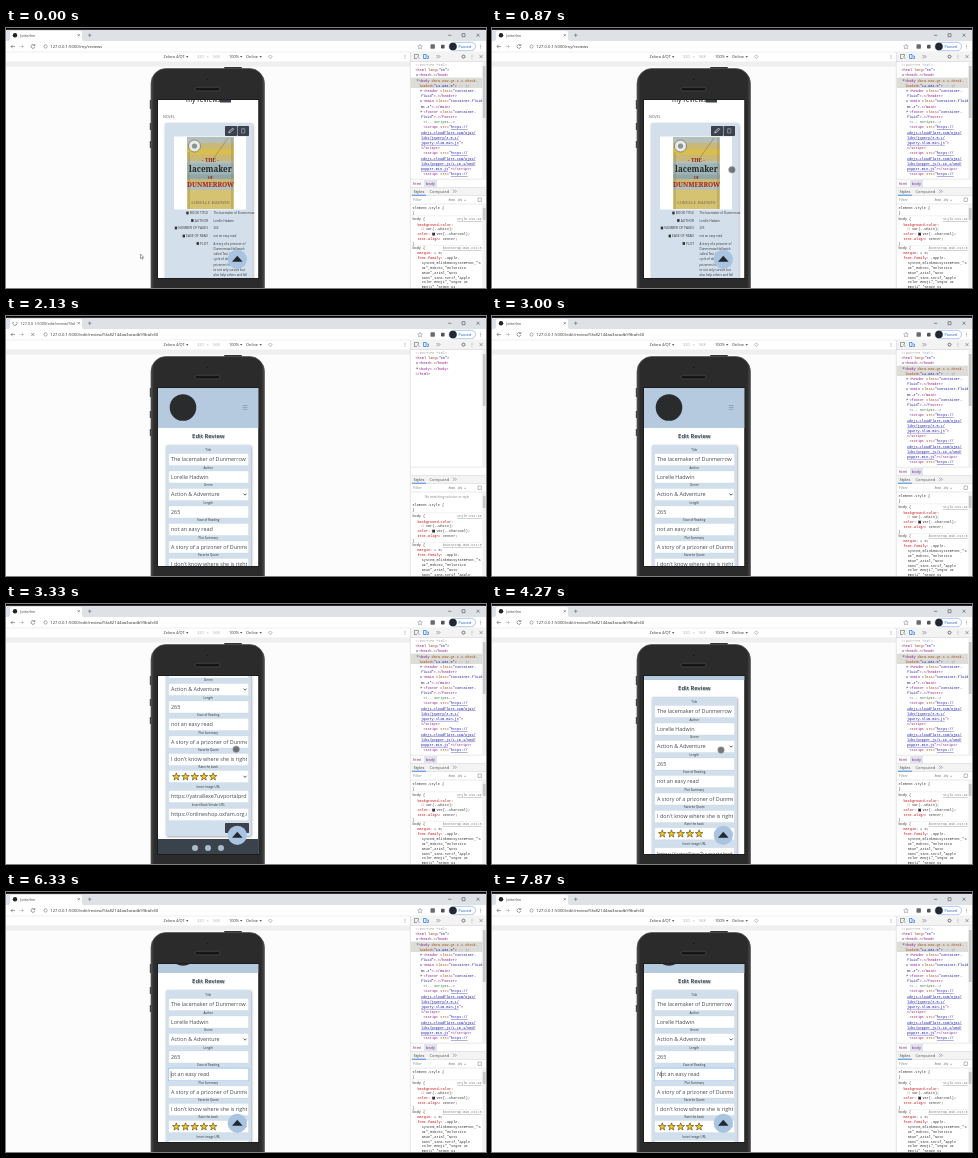
Recreate the animation shown at these times as an HTML page. Size 480 by 260 pixels, loop 8000 ms.

```html
<!DOCTYPE html>
<html lang="en">
<head>
<meta charset="utf-8">
<title>Edit review</title>
<style>
html, body { margin: 0; width: 100%; height: 100%; overflow: hidden; background: #fff; }
svg { display: block; width: 480px; height: 260px; }
text { font-family: "Open Sans", "Noto Sans", sans-serif; white-space: pre; }
.code { font-family: "Liberation Mono", "DejaVu Sans Mono", monospace; }
</style>
</head>
<body>
<svg id="stage" viewBox="0 0 480 260" xmlns="http://www.w3.org/2000/svg">
  <defs>
    <clipPath id="screen"><rect x="152" y="72" width="100.5" height="178"/></clipPath>
    <clipPath id="field"><rect x="163" y="130" width="78" height="200"/></clipPath>
    <clipPath id="tab"><rect x="14" y="2" width="55" height="11"/></clipPath>
    <linearGradient id="case">
      <stop offset="0" stop-color="#4a4a4a"/><stop offset=".03" stop-color="#2b2b2b"/>
      <stop offset=".97" stop-color="#2b2b2b"/><stop offset="1" stop-color="#4a4a4a"/>
    </linearGradient>
    <filter id="soft" x="-10%" y="-10%" width="120%" height="120%">
      <feDropShadow dx=".6" dy=".8" stdDeviation="1" flood-color="#445" flood-opacity=".55"/>
    </filter>
  </defs>
</svg>
<script>
const LOOP = 8000;
const stage = document.getElementById('stage');

function add(parent, tag, attrs = {}) {
  const node = document.createElementNS('http://www.w3.org/2000/svg', tag);
  for (const k in attrs) node.setAttribute(k, attrs[k]);
  return parent.appendChild(node);
}
const group = (p, attrs) => add(p, 'g', attrs);
const box = (p, x, y, width, height, fill, more) => add(p, 'rect', { x, y, width, height, fill, ...more });
const dot = (p, cx, cy, r, fill, more) => add(p, 'circle', { cx, cy, r, fill, ...more });
const line = (p, d, stroke = '#5f6368', w = .6, more) =>
  add(p, 'path', { d, stroke, 'stroke-width': w, fill: 'none', ...more });
const shape = (p, d, fill, more) => add(p, 'path', { d, fill, ...more });

// Text placed by its vertical centre
function text(p, x, cy, str, size, fill = '#333', more) {
  const t = add(p, 'text', { x, y: cy + size * .35, 'font-size': size, fill, ...more });
  t.textContent = str;
  return t;
}
const mid = { 'text-anchor': 'middle' };
const end = { 'text-anchor': 'end' };

// Code line: parts split by "|", each led by a colour letter
const INK = { t: '#881280', a: '#994500', v: '#1a1aa6', u: '#1a1aa6', c: '#236e25', g: '#a8a8a8', k: '#333', r: '#c80000' };
function code(p, x, cy, src) {
  const t = text(p, x, cy, '', 3.5, '#333', { class: 'code' });
  for (const part of src.split('|')) {
    const span = add(t, 'tspan', { fill: INK[part[0]] });
    if (part[0] === 'u') span.setAttribute('text-decoration', 'underline');
    span.textContent = part.slice(1);
  }
}
const fold = (p, x, y, open) =>
  shape(p, open ? `M${x} ${y - .8}h2.2l-1.1 1.8z` : `M${x} ${y - 1.1}v2.2l1.8-1.1z`, '#6e6e6e');

// Browser frame
box(stage, 0, 0, 480, 260, '#fcfcfc');
box(stage, 0, 0, 480, 13, '#dee1e6');
box(stage, 0, 0, 480, 1.8, '#000');
shape(stage, 'M2 13q2 0 2-2v-6q0-2 2-2h68q2 0 2 2v6q0 2 2 2z', '#fff');
const favicon = dot(stage, 9, 7.3, 2.2, '#222');
const spinner = line(stage, 'M9 5.2a2.1 2.1 0 1 1-2.1 2.1', '#777', .7);
const tabTitle = text(group(stage, { 'clip-path': 'url(#tab)' }), 14.3, 7.3, '', 3.8, '#3c4043');
line(stage, 'M71.5 6l2.4 2.4m0-2.4l-2.4 2.4M82 7.2h3.4m-1.7-1.7v3.4');
line(stage, 'M442 7.3h3.4M456 5.7h3v3h-3zM470.5 5.7l3 3m0-3l-3 3', '#333', .5);
box(stage, 0, 13, 480, 11, '#fff');
line(stage, 'M9 18.5h-4m1.8-1.8l-1.8 1.8l1.8 1.8');
line(stage, 'M13.5 18.5h4m-1.8-1.8l1.8 1.8l-1.8 1.8', '#aaa');
const reload = line(stage, 'M28.5 17.3a1.9 1.9 0 1 0 .3 1.6M28.8 16v1.6h-1.6');
const stop = line(stage, 'M25.3 17l3 3m0-3l-3 3');
dot(stage, 39.5, 18.5, 1.6, 'none', { stroke: '#5f6368', 'stroke-width': .5 });
const url = text(stage, 44.3, 18.6, '', 4.2, '#333');
line(stage, 'M414 16.2l.7 1.6 1.7.2-1.3 1.2.4 1.7-1.5-.9-1.5.9.4-1.7-1.3-1.2 1.7-.2z', '#5f6368', .4);
box(stage, 424.5, 16.3, 4.4, 4.4, '#686c72', { rx: .6 });
box(stage, 435, 16.7, 3.6, 3.8, '#50545a', { rx: .8 });
box(stage, 443, 14.3, 26.5, 8.4, '#fff', { rx: 4.2, stroke: '#8ab0ee', 'stroke-width': .7 });
dot(stage, 447, 18.5, 3.8, '#23272f');
text(stage, 452.5, 18.5, 'Paused', 3.7, '#1a62c8');
const dots = (x, y) => [-1.5, 0, 1.5].forEach(d => dot(stage, x, y + d, .45, '#5f6368'));
dots(474.5, 18.5);

// Device bar
box(stage, 0, 24, 404, 9.5, '#fff');
box(stage, 0, 33.5, 404, 5, '#efefef');
line(stage, 'M0 24H480', '#dcdee0', .5);
[[157.5, 'Zelora 4/QT', '#333'], [191, '320', '#aaa'], [200.5, '×', '#aaa'], [207, '568', '#aaa'],
 [223, '100%', '#333'], [240, 'Online', '#333']].forEach(([x, s, c]) => text(stage, x, 28.7, s, 3.9, c));
[180, 234, 253.5].forEach(x => shape(stage, `M${x} 28h2.4l-1.2 1.7z`, '#555'));
line(stage, 'M262.5 28.7l1.8-1.8 1.8 1.8-1.8 1.8z', '#777', .5);
dots(399, 28.7);

// Phone
box(stage, 218, 39, 18, 3, '#333', { rx: 1 });
[[72, 9], [95, 7], [113, 7]].forEach(([y, h]) => box(stage, 143.8, y, 2, h, '#3a3a3a', { rx: .6 }));
box(stage, 145, 40.5, 113.5, 240, 'url(#case)', { rx: 15, stroke: '#555', 'stroke-width': .7 });
dot(stage, 201.7, 51.5, 1.3, '#15181c', { stroke: '#444', 'stroke-width': .4 });
box(stage, 189, 59.3, 25, 3.6, '#151515', { rx: 1.8, stroke: '#555', 'stroke-width': .6 });
box(stage, 151.3, 71.3, 101.9, 179.4, '#181818');
const screen = group(stage, { 'clip-path': 'url(#screen)' });
box(screen, 152, 72, 100.5, 178, '#fff');

// Reviews page
const reviews = group(screen);
text(reviews, 180, 72.2, 'my reviews', 6.4, '#444', { 'font-weight': 600 });
box(reviews, 214, 71, 11, 3.5, '#3a3f47');
text(reviews, 157, 89, 'NOVEL', 3.7, '#666');
box(reviews, 159, 95, 87.5, 170, '#d3e0ec', { rx: 1.5, filter: 'url(#soft)' });
const editBtn = box(reviews, 219, 98, 12, 10, '#3b424d', { rx: .8 });
box(reviews, 231.5, 98, 11.5, 10, '#3b424d', { rx: .8 });
line(reviews, 'M222.7 104.8l.6-1.6 3.4-3 1 1-3.4 3.2z', '#e8eef5', .7);
line(reviews, 'M235 101h4.4M235.6 101.5v3.4h3.2v-3.4M236.5 100.3h1.4', '#aebccb', .6);
box(reviews, 168, 108.5, 72, 73, '#fff');
const cover = group(reviews);
box(cover, 181, 109, 47, 72, '#c9b877');
for (let i = 0; i < 6; i++) box(cover, 181, 109 + i * 12, 47, 6, i % 2 ? '#8fa7a8' : '#b5bfba');
box(cover, 181, 121, 47, 6, '#d8bd4f');
box(cover, 181, 162, 47, 19, '#d6c372');
box(cover, 181, 135.5, 47, 11, '#9fb4b4');
line(cover, 'M222 110L205 134M226 110v71M183 124v57', '#8d7e50', .6);
dot(cover, 188.5, 118, 6, '#e9ebe6', { stroke: '#777', 'stroke-width': .8 });
dot(cover, 188.5, 118, 2.6, '#8b948f');
const serif = { ...mid, 'font-weight': 700, style: 'font-family:"Noto Serif",serif' };
text(cover, 204.5, 132, '· THE ·', 5.2, '#8d2a22', serif);
text(cover, 204.5, 141, 'lacemaker', 8, '#242a2c', serif);
text(cover, 204.5, 149.3, 'OF', 4, '#8d2a22', serif);
text(cover, 204.5, 156.6, 'DUNMERROW', 6.6, '#a3241f', serif);
text(cover, 204.5, 175, 'LORELLE HADWIN', 4, '#8a835c', serif);
[['BOOK TITLE', 'The lacemaker of Dunmerrow', 185], ['AUTHOR', 'Lorelle Hadwin', 192.5],
 ['NUMBER OF PAGES', '265', 200], ['EASE OF READ', 'not an easy read', 208], ['PLOT', '', 215.5]]
  .forEach(([label, value, y]) => {
    const t = text(reviews, 202, y, label, 3.3, '#333', end);
    box(reviews, 198.5 - t.getComputedTextLength(), y - 1.4, 2.4, 2.8, '#333');
    text(reviews, 207.5, y, value, 2.95, '#333');
  });
['A story of a prizoner of', 'Dunmerrow-Hallowick', 'called Tovi. In a long', 'cycle of danger for the', 'prizoners he struggles',
 'to not only survive but', 'also help others and fall'].forEach((s, i) => text(reviews, 207.5, 215.5 + i * 5.25, s, 3, '#333'));

// Edit page
const edit = group(screen);
box(edit, 152, 72, 100.5, 40, '#b6cadf');
dot(edit, 177, 91.5, 13.3, '#2a2b2d');
line(edit, 'M236.8 89.5h4.6m-4.6 1.9h4.6m-4.6 1.9h4.6', '#77879a', .6);
text(edit, 202.3, 120, 'Edit Review', 5.9, '#333a44', { ...mid, 'font-weight': 600, style: 'text-shadow:.5px .6px 1px #9aa' });
box(edit, 160, 129, 85, 196, '#d0dfeb', { rx: 1.5, filter: 'url(#soft)' });
const ring = box(edit, 162, 206.7, 81.2, 13.4, '#80bdff', { rx: 1.6 });
const fields = [['Title', 'The lacemaker of Dunmerrow', 143.4], ['Author', 'Lorelle Hadwin', 160.9],
  ['Genre', 'Action & Adventure', 178.4], ['Length', '265', 195.9], ['Ease of Reading', 'not an easy read', 213.4],
  ['Plot Summary', 'A story of a prizoner of Dunme', 230.9], ['Favorite Quote', "I don't know where she is right", 248.4],
  ['Rate the book', '', 265.6], ['Insert image URL', 'https://yatra8exe7uvportalprd', 285.6],
  ['Insert Book Vendor URL', 'https://onlineshop.oxfam.org.u', 303.4]];
const inputs = fields.map(([label, value, y]) => {
  text(edit, 202.3, y - 9.3, label, 3, '#333', mid);
  box(edit, 162.7, y - 6, 79.8, 12, '#fff', { rx: 1, stroke: '#c6d0da', 'stroke-width': .3 });
  return text(group(edit, { 'clip-path': 'url(#field)' }), 165, y, value, 5.4, '#444b54');
});
[178.4, 265.6].forEach(y => line(edit, `M237.6 ${y - .8}l1.5 1.6l1.5-1.6`, '#333', .8));
for (let i = 0; i < 5; i++) {
  let d = '';
  for (let k = 0; k < 10; k++) {
    const r = k % 2 ? 1.7 : 4, a = k * Math.PI / 5;
    d += `${k ? 'L' : 'M'}${170.3 + i * 9.2 + r * Math.sin(a)} ${265.8 - r * Math.cos(a)}`;
  }
  shape(edit, d + 'z', '#f5c518', { stroke: '#4b4020', 'stroke-width': .6 });
}
box(edit, 219, 312, 24, 10, '#3b424d', { rx: .8 });
box(edit, 152, 328, 100.5, 16, '#3a424c');
[189, 202, 215].forEach(x => dot(edit, x, 337, 3, '#a9bccd'));
const caret = box(edit, 0, 210.2, .5, 6.6, '#222');

// Back-to-top button
const toTop = group(screen);
dot(toTop, 231.3, 231.3, 9.6, '#a9c4e0');
shape(toTop, 'M226 233.8l5.3-6 5.3 6z', '#22282f');

// Developer tools
box(stage, 404, 24, 76, 236, '#fff');
box(stage, 404, 24, 76, 9.5, '#f3f3f3');
line(stage, 'M404.3 24V260M404 33.5H480', '#c8c8c8', .5);
line(stage, 'M411 30.5h-2.5v-4h4v2M411 28.5l2.5 2.2', '#666', .6);
line(stage, 'M417.5 26.5h2.6v4h-2.6zM421 28h1.4v2.5h-1.4', '#1a73e8', .7);
line(stage, 'M430.5 27l1.5 1.6-1.5 1.6m2-3.2l1.5 1.6-1.5 1.6', '#666', .6);
dot(stage, 457.5, 28.6, 1.5, 'none', { stroke: '#666', 'stroke-width': .9 });
dots(466, 28.6);
line(stage, 'M473.5 27.1l3 3m0-3l-3 3', '#666', .6);

const tree = group(stage), loadTree = group(stage);
const row = i => 36.7 + i * 5.2;
for (const g of [tree, loadTree]) {
  if (g === tree) box(g, 404.6, 49.6, 72, 10.4, '#dcddd8');
  code(g, 409.5, row(0), 'g<!DOCTYPE html>');
  code(g, 409.5, row(1), 't<html |alang|t=|v"en"|t>');
  fold(g, 410.5, row(2));
  code(g, 413, row(2), 't<head>|k…|t</head>');
}
fold(loadTree, 410.5, row(3));
code(loadTree, 413, row(3), 't<body>|k…|t</body>');
code(loadTree, 409.5, row(4), 't</html>');
fold(tree, 410.5, row(3), true);
[[413, 't<body |adata-new-gr-c-s-check-'], [413, 'aloaded|t=|v"14.983.0"|t>|g == $0'],
 [417.5, 't<header |aclass|t=|v"container-'], [415, 'vfluid"|t>|k…|t</header>'],
 [417.5, 't<main |aclass|t=|v"container-fluid'], [415, 'vmt-3"|t>|k…|t</main>'],
 [417.5, 't<footer |aclass|t=|v"container-'], [415, 'vfluid"|t>|k…|t</footer>'],
 [417.5, 'c<\!-- Scripts-->'], [417.5, 't<script |asrc|t="|uhttps://'],
 [415, 'ucdnjs.cloudflare.com/ajax/'], [415, 'ulibs/jquery/3.5.1/'], [415, 'ujquery.slim.min.js|t">'], [415, 't<\/script>'],
 [417.5, 't<script |asrc|t="|uhttps://'], [415, 'ucdnjs.cloudflare.com/ajax/'],
 [415, 'ulibs/popper.js/1.16.1/umd/'], [415, 'upopper.min.js|t"><\/script>'], [417.5, 't<script |asrc|t="|uhttps://']]
  .forEach(([x, s], i) => code(tree, x, row(i + 3), s));
[5, 7, 9].forEach(i => fold(tree, 414.5, row(i)));
box(tree, 418, 152, 13, 7, '#dfe5ee');
text(tree, 407, 155.6, 'html', 3.8, '#881280');
text(tree, 420, 155.6, 'body', 3.8, '#881280');

const styles = group(stage);
code(styles, 406.5, 179.3, 'kelement.style {');
code(styles, 406.5, 184.3, 'k}');
code(styles, 406.5, 191, 'kbody {');
[[196.3, 'rbackground-color|k:'], [201.2, 'k  □ var(--white);'], [206.1, 'rcolor|k:   var(--charcoal);'], [211, 'rtext-align|k: center;']]
  .forEach(([y, s]) => code(styles, 411.5, y, s));
box(styles, 426.2, 204.7, 2.8, 2.8, '#333');
code(styles, 406.5, 215.3, 'k}');
code(styles, 406.5, 219.8, 'kbody {');
['rmargin|k: ▸ 0;', 'rfont-family|k: -apple-', 'k  system,BlinkMacSystemFont,"S', 'k  UI",Roboto,"Helvetica', 'k  Neue",Arial,"Noto',
 'k  Sans",sans-serif,"Apple', 'k  Color Emoji","Segoe UI', 'k  Emoji","Segoe UI'].forEach((s, i) => code(styles, 411.5, 224.8 + i * 4.9, s));
[[191, 'style.css:24'], [219.8, 'bootstrap.min.css:6']].forEach(([y, s]) =>
  text(styles, 475.5, y, s, 3.4, '#777', { ...end, class: 'code', 'text-decoration': 'underline' }));
line(styles, 'M404 187.8H476M404 217.5H476', '#e0e0e0', .4);
const noMatch = text(stage, 441, 181, 'No matching selector or style', 3.5, '#888', { ...mid, 'font-style': 'italic' });

box(stage, 404.6, 159.5, 75.4, 8, '#f3f3f3');
line(stage, 'M404 151.2H480M404 159.5H480M404 167.5H480M404 176H480', '#d0d0d0', .5);
line(stage, 'M406 167.2H420', '#1a73e8', .8);
text(stage, 407.5, 163.3, 'Styles', 4, '#333');
text(stage, 423.5, 163.3, 'Computed', 4, '#555');
line(stage, 'M447 161.8l1.4 1.5-1.4 1.5m2-3l1.4 1.5-1.4 1.5', '#666', .5);
text(stage, 407, 171.8, 'Filter', 3.8, '#888');
text(stage, 442, 171.8, ':hov  .cls  +', 3.6, '#555');
line(stage, 'M472 170h3.4v3.4h-3.4z', '#777', .5);
box(stage, 476.4, 33.8, 3.6, 117, '#f1f1f1');
box(stage, 476.4, 176.2, 3.6, 84, '#f1f1f1');
box(stage, 476.8, 38, 2.8, 52, '#c8c8c8');
box(stage, 476.8, 180, 2.8, 12, '#c8c8c8');

// Pointers
const arrow = shape(stage, 'M0 0v4.6l1.1-1 .8 1.7.7-.3-.8-1.7h1.5z', '#fff', { stroke: '#222', 'stroke-width': .4 });
const touch = dot(stage, 0, 0, 3.3, '#4d4d4d', { stroke: '#888', 'stroke-width': .5 });

// Rows of [time, value, ...]; values move linearly between rows
function track(rows, t) {
  if (t <= rows[0][0]) return rows[0].slice(1);
  for (let i = 1; i < rows.length; i++) {
    const [a, b] = [rows[i - 1], rows[i]];
    if (t < b[0]) return a.slice(1).map((v, k) => v + (b[k + 1] - v) * (t - a[0]) / (b[0] - a[0]));
  }
  return rows[rows.length - 1].slice(1);
}
const SCROLL = [[3070, 0], [3270, 93], [3400, 93], [3930, 50], [4130, 50], [4270, 36], [4400, 31]];
const POINTER = [[70, 134.5, 226], [600, 240, 142], [870, 240, 142], [1070, 224.5, 102.5], [2400, 224.5, 102.5],
  [3070, 230.5, 145], [4270, 229, 146], [4500, 229, 146], [4930, 172.3, 186.3]];

const show = (node, on) => node.setAttribute('display', on ? 'inline' : 'none');
const within = (t, a, b) => t >= a && t < b;

function draw(t) {
  const loading = within(t, 1530, 2330), onEdit = t >= 1930;
  const address = '127.0.0.1:5000/' + (t < 1530 ? 'my/reviews' : 'edit/review/5fa82144aa3acadb99bafc60');
  url.textContent = address;
  tabTitle.textContent = loading ? address : 'Jotterlee';
  show(favicon, !loading); show(spinner, loading);
  show(reload, !loading); show(stop, loading);
  spinner.setAttribute('transform', `rotate(${t * .36 % 360} 9 7.3)`);
  show(tree, !loading); show(loadTree, loading); show(noMatch, loading);
  styles.setAttribute('transform', `translate(0 ${loading ? 9 : 0})`);

  show(reviews, !onEdit); show(edit, onEdit);
  editBtn.setAttribute('fill', t >= 1070 ? '#14181e' : '#3b424d');
  const [scroll] = track(SCROLL, t);
  edit.setAttribute('transform', `translate(0 ${-scroll})`);
  show(toTop, !onEdit || scroll > 6);

  const [x, y] = track(POINTER, t), outside = x < 152;
  show(arrow, outside);
  show(touch, !outside && (t < 1330 || within(t, 3070, 6330)));
  arrow.setAttribute('transform', `translate(${x} ${y})`);
  touch.setAttribute('cx', x);
  touch.setAttribute('cy', y);
  touch.setAttribute('opacity', within(t, 5130, 5330) ? .85 : .75);

  ring.setAttribute('opacity', Math.min(1, Math.max(0, (t - 5330) / 150)));
  inputs[4].textContent = (t < 6330 ? 'n' : t < 6800 ? '' : 'N') + 'ot an easy read';
  caret.setAttribute('x', t < 6330 ? 168.2 : t < 6800 ? 164.8 : 169);
  show(caret, within(t, 5330, 5870) || within(t, 6330, 7330) || t >= 7830);
}
function tick() {
  draw(performance.now() % LOOP);
  requestAnimationFrame(tick);
}
tick();
</script>
</body>
</html>
```
